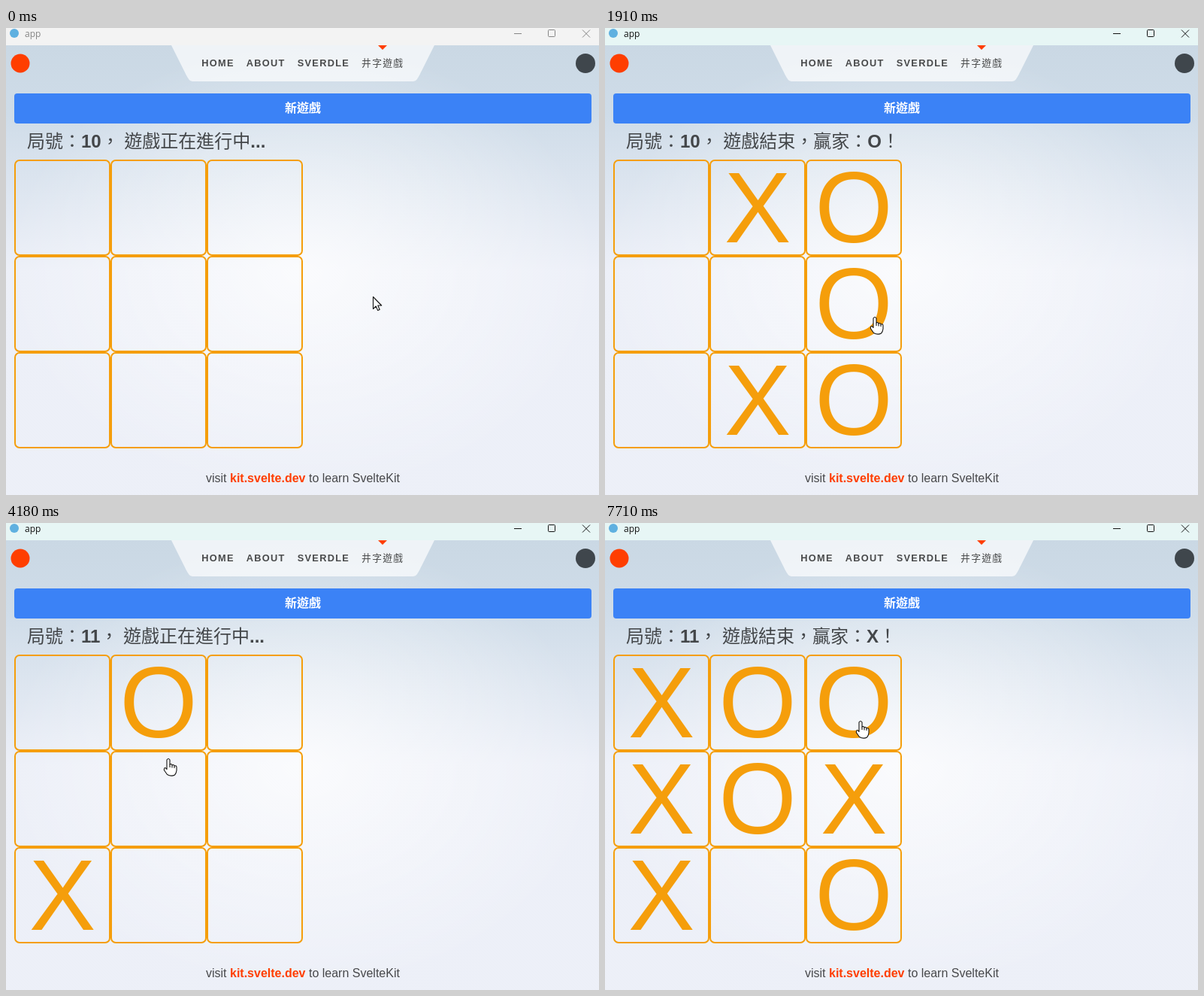
An HTML page with a canvas that plays this animation: 789 px wide and 621 px high, repeating every 8 s.

```html
<!DOCTYPE html>
<html lang="zh-Hant">
<head>
<meta charset="utf-8">
<title>app</title>
<style>
  html, body { margin: 0; width: 100%; height: 100%; overflow: hidden; }
  canvas { display: block; }
</style>
</head>
<body>
<canvas id="stage" width="789" height="621"></canvas>
<script>
const ctx = document.getElementById('stage').getContext('2d');
const W = 789, H = 621, BAR = 23, MID = W / 2, LOOP = 8000;
const LATIN = '"Liberation Sans", Arial, sans-serif';
const CJK = '"Noto Sans CJK TC", "Noto Sans CJK", sans-serif';
const INK = 'rgba(0,0,0,0.7)', ORANGE = '#ff3e00', AMBER = '#f59e0b';
const CELL = 128, LEFT = 11, TOP = 175;
const FOCUS = 540, FLASH = 70, TRAVEL = 700;
const START = { x: 488, y: 357 };

// The pointer leaves for x, y and clicks there; a move is [cell of O, reply of X]
const STOPS = [
  { leave: 70, x: 346, y: 238, click: 690, move: [2, 1] },
  { leave: 700, x: 352, y: 372, click: 1080, move: [5, 7] },
  { leave: 1170, x: 346, y: 480, click: 1640, move: [8] },
  { leave: 1815, x: 397, y: 106, click: 3080 },
  { leave: 3180, x: 207, y: 262, click: 3970, move: [1, 6] },
  { leave: 4040, x: 231, y: 402, click: 4860, move: [4, 5] },
  { leave: 5330, x: 330, y: 484, click: 5880, move: [8, 3] },
  { leave: 6030, x: 339, y: 237, click: 7100, move: [2, 0] },
  { leave: 7180, x: 340, y: 265, click: Infinity }
];

const easeOut = u => 1 - (1 - u) ** 2;

function pointerAt(t) {
  let { x, y } = START;
  for (const s of STOPS) {
    if (t < s.leave) break;
    const time = Math.min(TRAVEL, s.click - s.leave);
    const k = easeOut(Math.min(1, (t - s.leave) / time));
    x += (s.x - x) * k;
    y += (s.y - y) * k;
  }
  return [x, y];
}

// Replays the clicks made so far; a click without a move starts a new game
function gameAt(t) {
  let id = 10, cells = [];
  for (const { click, move } of STOPS) {
    if (t < click + FLASH) break;
    if (move) {
      move.forEach((cell, i) => cells[cell] = 'OX'[i]);
    } else {
      id++;
      cells = [];
    }
  }
  return { id, cells };
}

function winner(cells) {
  const line = (a, step) => cells[a] && cells[a] === cells[a + step] &&
    cells[a] === cells[a + 2 * step] ? cells[a] : '';
  for (let i = 0; i < 3; i++) {
    const found = line(i * 3, 1) || line(i, 3);
    if (found) return found;
  }
  return line(0, 4) || line(2, 2);
}

const within = (x, y, l, t, w, h) => x >= l && x < l + w && y >= t && y < t + h;
const corner = i => [LEFT + i % 3 * CELL, TOP + Math.floor(i / 3) * CELL];

function box(x, y, w, h, r) {
  ctx.beginPath();
  ctx.roundRect(x, y, w, h, r);
}

function dot(x, y, r, color) {
  ctx.fillStyle = color;
  ctx.beginPath();
  ctx.arc(x, y, r, 0, Math.PI * 2);
  ctx.fill();
}

function text(str, x, y, font, color, align = 'left') {
  ctx.font = font;
  ctx.fillStyle = color;
  ctx.textAlign = align;
  ctx.fillText(str, x, y);
  return ctx.measureText(str).width;
}

function background() {
  const page = H - BAR;
  const sky = ctx.createLinearGradient(0, BAR, 0, H);
  sky.addColorStop(0, 'rgb(202,216,228)');
  sky.addColorStop(0.15, 'hsl(209,36%,86%)');
  sky.addColorStop(0.5, 'hsl(224,44%,95%)');
  ctx.fillStyle = sky;
  ctx.fillRect(0, BAR, W, page);

  ctx.save();
  ctx.translate(MID, BAR + page / 2);
  ctx.scale(MID, page / 2);
  const glow = ctx.createRadialGradient(0, 0, 0, 0, 0, 1);
  glow.addColorStop(0, 'rgba(255,255,255,0.75)');
  glow.addColorStop(1, 'rgba(255,255,255,0)');
  ctx.fillStyle = glow;
  ctx.fillRect(-1, -1, 2, 2);
  ctx.restore();
}

function titleBar(active) {
  const ink = active ? '#111' : '#858585';
  ctx.fillStyle = active ? '#e7f6f5' : '#f3f3f3';
  ctx.fillRect(0, 0, W, BAR);
  dot(11, 7, 6, '#5fb0e0');
  text('app', 25, 12, '12px "Open Sans", sans-serif', ink);
  ctx.strokeStyle = ink;
  ctx.lineWidth = 1;
  ctx.stroke(new Path2D('M676 7.5h10M767 2.5l10 10m0-10l-10 10'));
  box(721.5, 2.5, 9, 9, 1);
  ctx.stroke();
}

function header() {
  dot(19, 47, 12.5, ORANGE);
  dot(771, 47, 13, '#3f464c');
  ctx.fillStyle = 'rgba(255,255,255,0.7)';
  ctx.fill(new Path2D('M220 23l16 32c8 16 8 16 16 16h286c8 0 8 0 16-16l16-32z'));
  ctx.fillStyle = ORANGE;
  ctx.fill(new Path2D('M495 23h12l-6 6z'));

  ctx.letterSpacing = '1.28px';
  let x = 260.3;
  for (const label of ['HOME', 'ABOUT', 'SVERDLE'])
    x += text(label, x, 51, 'bold 12.8px ' + LATIN, INK) + 16;
  text('井字遊戲', x, 51, '12.8px ' + CJK, INK);
  ctx.letterSpacing = '0px';
}

function newGameButton(hover) {
  ctx.fillStyle = hover ? '#1d4ed8' : '#3b82f6';
  box(LEFT, 87, W - 21, 40, 4);
  ctx.fill();
  text('新遊戲', 395, 112, 'bold 16px ' + CJK, '#fff', 'center');
}

function status({ id, cells }) {
  const won = winner(cells);
  const state = won ? `遊戲結束，贏家：${won}！` : '遊戲正在進行中...';
  const runs = `局號：${id}， ${state}`.match(/[\u3000-\uffef]+|[^\u3000-\uffef]+/g);
  let x = 28;
  for (const run of runs) {
    const font = run > '\u3000' ? '500 24px ' + CJK : 'bold 24px ' + LATIN;
    x += text(run, x, 159, font, '#434649');
  }
}

function board(cells) {
  for (let i = 0; i < 9; i++) {
    const [x, y] = corner(i);
    ctx.strokeStyle = AMBER;
    ctx.lineWidth = 2;
    box(x + 1, y + 1, CELL - 2, CELL - 2, 6);
    ctx.stroke();
    if (cells[i]) text(cells[i], x + CELL / 2, y + 110, '133px ' + LATIN, AMBER, 'center');
  }
}

function footer() {
  const font = '16px ' + LATIN;
  let x = 266;
  x += text('visit ', x, 604, font, INK);
  x += text('kit.svelte.dev', x, 604, 'bold ' + font, ORANGE);
  text(' to learn SvelteKit', x, 604, font, INK);
}

const ARROW = new Path2D('M.5 .5V16.5L4.2 13L6.7 18.6L9.2 17.5L6.8 12H11.7Z');
const HAND = new Path2D('M-2 2Q0-1 2 2V8Q4.5 6.8 5 9Q7.5 7.8 8 10Q11 9 11 12V16Q10.5 20 8.5 22Q4 24.5-1.5 21.5L-5.7 15.5Q-5.5 10-2 14.5Z');
const KNUCKLES = new Path2D('M2 8v4m3-3v3.5m3-2.5v3');

function pointer(x, y, hand) {
  const shape = hand ? HAND : ARROW;
  ctx.save();
  ctx.translate(Math.round(x), Math.round(y));
  ctx.fillStyle = '#fff';
  ctx.strokeStyle = '#111';
  ctx.lineWidth = 1.1;
  ctx.lineJoin = 'round';
  ctx.fill(shape);
  ctx.stroke(shape);
  if (hand) ctx.stroke(KNUCKLES);
  ctx.restore();
}

function draw(t) {
  const [x, y] = pointerAt(t);
  const game = gameAt(t);
  const overButton = within(x, y, LEFT, 87, W - 21, 40);
  const overBoard = within(x, y, LEFT, TOP, 3 * CELL, 3 * CELL);
  background();
  titleBar(t >= FOCUS);
  header();
  newGameButton(overButton);
  status(game);
  board(game.cells);
  footer();
  if (STOPS.some(s => t >= s.click && t < s.click + FLASH)) dot(x, y, 12, 'rgba(255,255,0,0.6)');
  pointer(x, y, overButton || overBoard);
}

const begin = performance.now();
function tick() {
  draw((performance.now() - begin) % LOOP);
  requestAnimationFrame(tick);
}
tick();
</script>
</body>
</html>
```
